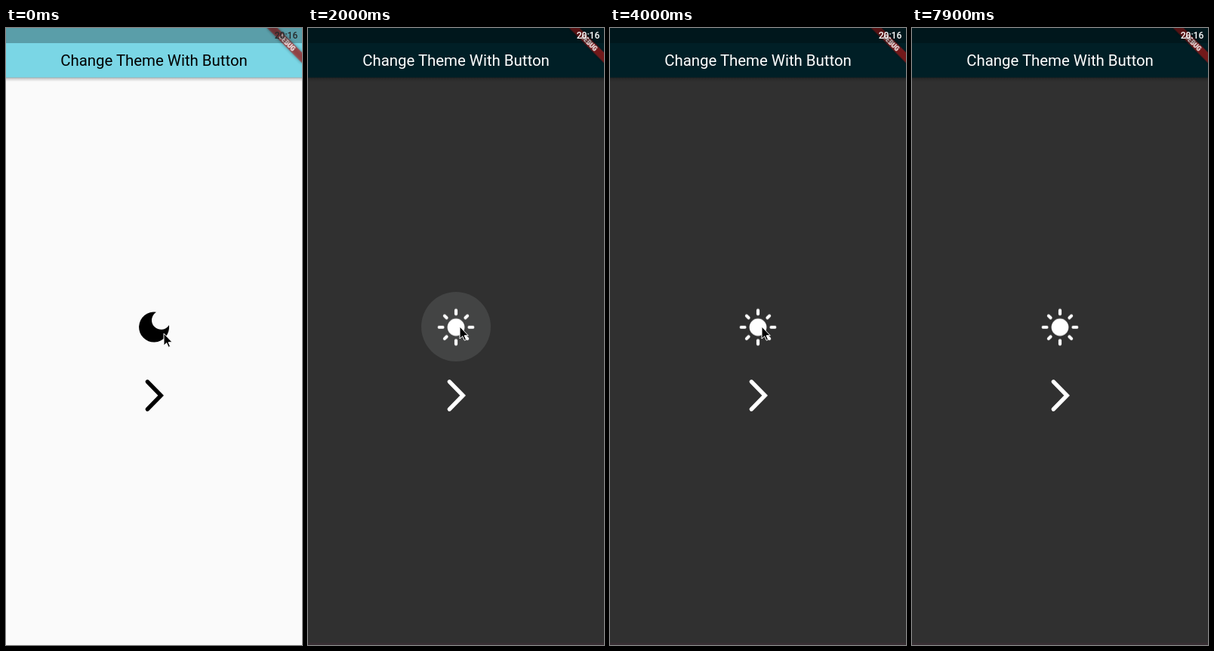
Animation of 392 by 816 pixels, one loop 9.2 s. Source, as an HTML page:

```html
<!DOCTYPE html>
<html lang="en">
<head>
<meta charset="utf-8">
<title>Change Theme</title>
<style>
  html, body { margin: 0; width: 100%; height: 100%; overflow: hidden; background: #303030; }
  svg { display: block; width: 100vw; height: 100vh; overflow: hidden; font-family: Roboto, "Open Sans", sans-serif; }
  .page { transform-origin: 196px 408px; }
  .title { font-size: 20.4px; text-anchor: middle; fill: currentColor; }
  .ink { fill: currentColor; }
  .line { fill: none; stroke: currentColor; stroke-width: 5.4; }
  .ring { fill: rgba(204, 215, 215, .12); }
  .ring.day { fill: rgba(130, 138, 150, .13); }
</style>
</head>
<body>
<svg id="stage" viewBox="0 0 392 816">
  <defs>
    <linearGradient id="fall" x2="0" y2="1">
      <stop stop-opacity=".38"/>
      <stop offset=".35" stop-opacity=".16"/>
      <stop offset="1" stop-opacity="0"/>
    </linearGradient>
    <filter id="blur" x="-20%" y="-80%" width="140%" height="260%"><feGaussianBlur stdDeviation="2"/></filter>
  </defs>

  <g class="page" id="button-page">
    <rect class="bg" width="392" height="816"/>
    <rect y="65" width="392" height="6" fill="url(#fall)"/>
    <rect class="bar" width="392" height="65.5"/>
    <text class="title" x="196" y="50">Change Theme With Button</text>
    <circle class="ring day" id="day-ring" cx="196" cy="395" r="46"/>
    <circle class="ring" id="night-ring" cx="196" cy="395" r="46"/>
    <path class="ink" id="moon" d="M199 375.8A20 20 0 1 0 215.9 393A12.4 12.4 0 1 1 199 375.8Z"/>
    <g id="sun" transform="translate(196 395.7)">
      <circle class="ink" r="11.4"/>
    </g>
    <circle class="ring" id="next-ring" cx="196" cy="486" r="46"/>
    <path class="line" stroke-linecap="round" d="M187.4 467.8L205.2 486L187.4 504.2"/>
  </g>

  <rect id="scrim" width="392" height="816"/>

  <g class="page" id="switch-page">
    <rect class="bg" width="392" height="816"/>
    <rect y="65" width="392" height="6" fill="url(#fall)"/>
    <rect class="bar" width="392" height="65.5"/>
    <text class="title" x="196" y="50">Change Theme With Lotti</text>
    <rect x="160" y="380.5" width="78" height="29.5" rx="14.7" fill="#383838"/>
    <circle cx="222.3" cy="395.2" r="16.4" fill="#555"/>
    <path class="ink" d="M226.5 387A8.4 8.4 0 1 0 229 403A9.6 9.6 0 0 1 226.5 387Z"/>
    <circle class="ring" id="back-ring" cx="196" cy="469" r="46"/>
    <path class="line" d="M206.5 449L186.3 469.2L206.5 489.4"/>
  </g>

  <rect id="edge" y="813" width="392" height="3" fill="#382f34"/>

  <g transform="translate(392 0) rotate(45)">
    <rect x="-33" y="22.8" width="66" height="9.8" opacity=".4" filter="url(#blur)"/>
    <rect x="-33" y="22.8" width="66" height="9.8" fill="#b71c1c" fill-opacity=".63"/>
    <text y="30.7" font-size="8.3" font-weight="900" text-anchor="middle" fill="#fff">DEBUG</text>
  </g>
  <rect width="392" height="20" fill-opacity=".26"/>
  <text id="clock" x="371" y="14.4" font-size="12" font-weight="500" text-anchor="middle">20:16</text>

  <path id="cursor" d="M0 0V16L3.7 12.6L6.2 18.2L8.5 17.2L6.1 11.7H11.2Z" stroke="#fff" stroke-width="1"/>
</svg>
<script>
const LOOP = 9200, TICK = 100;
const ZOOM_IN = 'cubic-bezier(.05,0,.1333,.06)', ZOOM_OUT = 'cubic-bezier(.2083,.82,.25,1)';
const tracks = [];

// steps: [time, value, easing to the next step]
function track(selector, prop, steps) {
  const all = [[0, steps[0][1]], ...steps, [LOOP, steps[steps.length - 1][1]]];
  const frames = all.map(([t, value, easing = 'linear']) => ({ offset: t / LOOP, [prop]: value, easing }));
  for (const el of document.querySelectorAll(selector)) {
    const anim = el.animate(frames, { duration: LOOP, iterations: Infinity });
    anim.pause();
    tracks.push(anim);
  }
}

function toggle(selector, prop, first, changes) {
  track(selector, prop, [[0, first, 'step-end'], ...changes.map(([t, v]) => [t, v, 'step-end'])]);
}

// Theme fades: day to night, back to day, then night again
function theme(selector, prop, day, night) {
  track(selector, prop, [
    [570, day], [770, night],
    [2070, night], [2270, day],
    [3770, day], [3970, night]
  ]);
}

function zoom(start, from, to) {
  const scale = k => `scale(${from + (to - from) * k})`;
  return [[start, scale(0), ZOOM_IN], [start + 50, scale(.4), ZOOM_OUT], [start + 300, scale(1)]];
}

const press = t => [[t - 1, 0], [t, .6], [t + 100, 1], [t + 200, 1], [t + 400, 0]];
const tap = t => [[t - 1, 0], [t, 1], [t + 100, 1], [t + 300, 0]];

const sun = document.getElementById('sun');
for (let i = 0; i < 8; i++) {
  const ray = document.createElementNS('http://www.w3.org/2000/svg', 'path');
  ray.setAttribute('d', i % 2 ? 'M17.6 0H21.4' : 'M17.5 0H22.3');
  ray.setAttribute('transform', `rotate(${i * 45})`);
  ray.setAttribute('stroke', 'currentColor');
  ray.setAttribute('stroke-width', 4.2);
  ray.setAttribute('stroke-linecap', 'round');
  sun.append(ray);
}

theme('#stage', 'color', '#000000', '#ffffff');
theme('.bg', 'fill', '#fafafa', '#303030');
theme('.bar', 'fill', '#7ad6e5', '#001f26');
theme('#edge', 'opacity', 0, 1);
toggle('#moon', 'opacity', 1, [[600, 0], [2100, 1], [3800, 0]]);
toggle('#sun', 'opacity', 0, [[600, 1], [2100, 0], [3800, 1]]);
toggle('#clock', 'fill', '#26292a', [[700, '#fff'], [2300, '#26292a'], [3900, '#fff']]);

track('#day-ring', 'opacity', [...tap(500), ...tap(3700)]);
track('#night-ring', 'opacity', [[1899, 0], [1900, .6], [2000, 1], [2200, 1], [2500, 0]]);
track('#next-ring', 'opacity', press(5500));
track('#back-ring', 'opacity', press(6700));

track('#button-page', 'transform', [...zoom(5600, 1, 1.05), ...zoom(6800, 1.1, 1)]);
track('#switch-page', 'transform', [...zoom(5600, .85, 1), ...zoom(6800, 1, .9)]);
track('#switch-page', 'opacity', [[5637, 0], [5675, 1], [6825, 1], [6862, 0]]);
track('#scrim', 'opacity', [[5662, 0], [5725, .6], [5899, .6], [5900, 0]]);

const path = [
  [0, 209, 404], [300, 201, 395], [4600, 201, 395], [5300, 194, 484], [5600, 194, 484],
  [5900, 201, 475], [6400, 195, 489], [6500, 195, 490], [7500, 195, 490], [7800, 252, 761]
];
track('#cursor', 'transform', path.map(([t, x, y]) => [t, `translate(${x}px, ${y}px)`]));
toggle('#cursor', 'opacity', 1, [[7900, 0]]);

const begin = performance.now();
function draw() {
  const now = Math.max(0, performance.now() - begin) % LOOP;
  const time = Math.floor(now / TICK) * TICK;
  for (const anim of tracks) anim.currentTime = time;
  requestAnimationFrame(draw);
}
draw();
</script>
</body>
</html>
```
